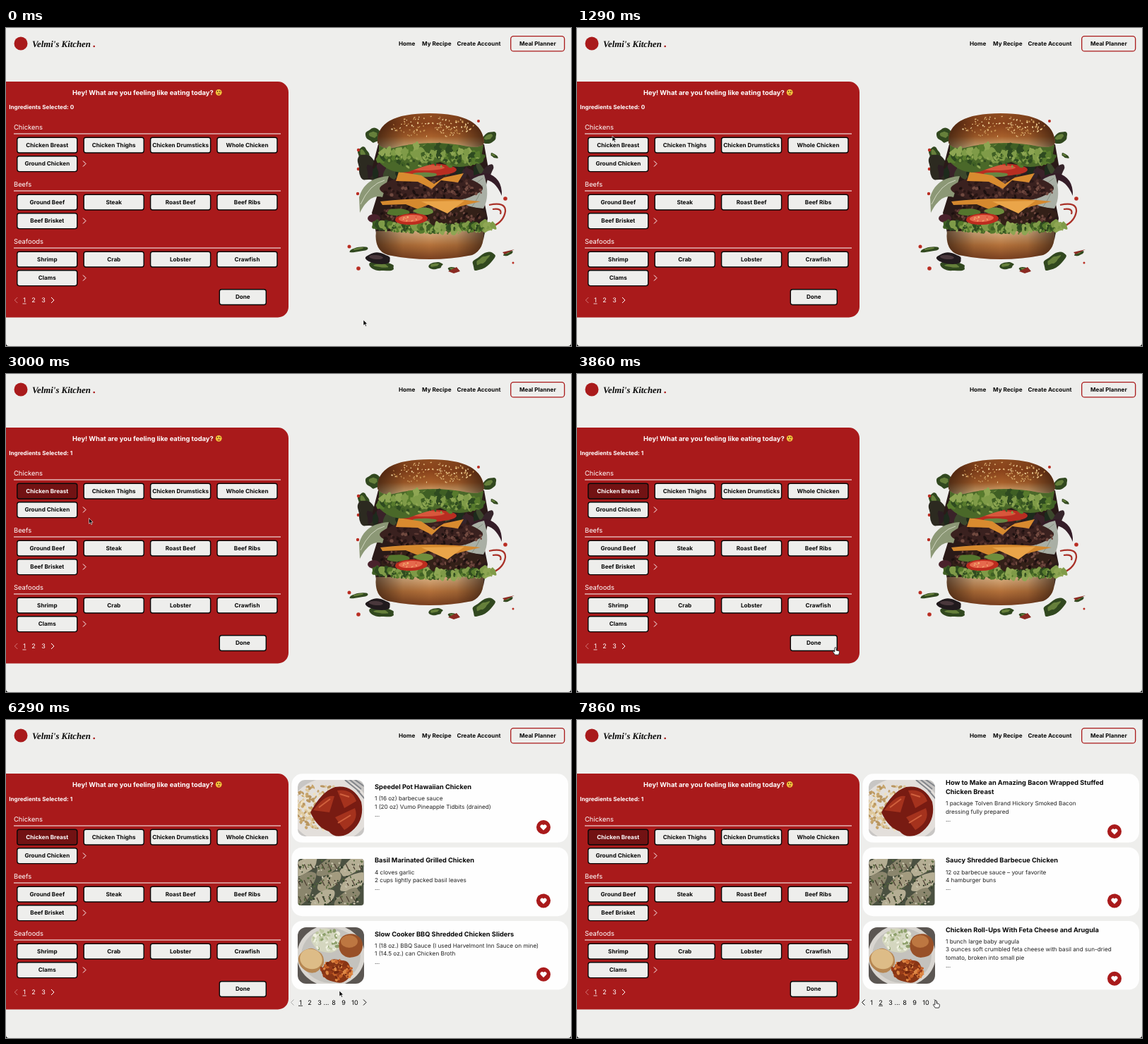
Animation of 800 by 451 pixels, one loop 8 s. Source, as an HTML page:

```html
<!DOCTYPE html>
<html lang="en">
<head>
<meta charset="utf-8">
<title>Recipe finder</title>
<style>
html, body { margin: 0; width: 100%; height: 100%; overflow: hidden; background: #000; }
svg { display: block; width: 100vw; height: 100vh; }
text { font-family: Inter, sans-serif; font-size: 8.15px; text-rendering: geometricPrecision; }
.bold { font-weight: 700; }
.mid { text-anchor: middle; }
.title { font-size: 9.25px; font-weight: 700; }
.body { font-size: 8.2px; fill: #222; }
.page { font-size: 9px; text-anchor: middle; }
.brand { font: italic 700 12.8px "Liberation Serif", serif; }
</style>
</head>
<body>
<svg id="stage" viewBox="0 0 800 451"></svg>
<script>
const RED = '#a91a1b', PAPER = '#eeeeec', INK = '#080808';
const STEP = 1000 / 7, STEPS = 56;

let seed = 11;
const rnd = () => (seed = (seed * 16807) % 2147483647) / 2147483647;
const between = (a, b) => a + (b - a) * rnd();
const pick = list => list[Math.floor(rnd() * list.length)];
const many = (n, make) => Array.from({ length: n }, (_, i) => make(i)).join('');

const text = (x, y, str, cls = '', fill = INK, extra = '') =>
  `<text x="${x}" y="${y}" class="${cls}" fill="${fill}" ${extra}>${str}</text>`;
const rect = (x, y, w, h, r, fill, extra = '') =>
  `<rect x="${x}" y="${y}" width="${w}" height="${h}" rx="${r}" fill="${fill}" ${extra}/>`;
const path = (d, fill, extra = '') => `<path d="${d}" fill="${fill}" ${extra}/>`;
const line = (d, color, w = 1, extra = '') => path(d, 'none', `stroke="${color}" stroke-width="${w}" ${extra}`);
const oval = (x, y, rx, ry, fill, turn = 0) =>
  `<ellipse cx="${x}" cy="${y}" rx="${rx}" ry="${ry}" fill="${fill}" transform="rotate(${turn} ${x} ${y})"/>`;
const dot = (x, y, r, fill, extra = '') => `<circle cx="${x}" cy="${y}" r="${r}" fill="${fill}" ${extra}/>`;
const group = (id, inner) => `<g id="${id}">${inner}</g>`;
const chevron = (x, y, dir, color) =>
  line(`M${x - 2 * dir} ${y - 4}l${4 * dir} 4l${-4 * dir} 4`, color);
const button = (x, y, w, label, id = '') =>
  group(id, rect(x, y, w, 21.8, 3, PAPER, `stroke="${INK}" stroke-width="1.4"`) +
    text(x + w / 2, y + 13.6, label, 'bold mid'));
const stops = colors => colors.map((c, i) => `<stop offset="${i / (colors.length - 1)}" stop-color="${c}"/>`).join('');
const gradient = (id, axis, ...colors) =>
  `<linearGradient id="${id}" x2="${axis === 'x' ? 1 : 0}" y2="${axis === 'y' ? 1 : 0}">${stops(colors)}</linearGradient>`;

// Irregular rounded outline
function blob(x, y, rx, ry, fill, rough = .25, turn = 0) {
  const n = 14, points = Array.from({ length: n }, (_, i) => {
    const a = i / n * 2 * Math.PI, k = 1 - rough * rnd();
    return [x + rx * k * Math.cos(a), y + ry * k * Math.sin(a)];
  });
  const half = (p, q) => `${(p[0] + q[0]) / 2} ${(p[1] + q[1]) / 2}`;
  const d = points.map((p, i) => `Q${p} ${half(p, points[(i + 1) % n])}`).join('');
  return path(`M${half(points[n - 1], points[0])}${d}Z`, fill, `transform="rotate(${turn} ${x} ${y})"`);
}
const specks = (n, x, y, rx, ry, size, colors) => many(n, () => {
  const a = rnd() * 7, k = Math.sqrt(rnd());
  return oval(x + rx * k * Math.cos(a), y + ry * k * Math.sin(a), size * between(.5, 1.2), size * between(.4, .8), pick(colors), between(0, 180));
});
const frill = (n, x0, x1, y, sag, h, colors) => many(n, i => {
  const u = i / (n - 1);
  return blob(x0 + (x1 - x0) * u, y + sag * 4 * u * (1 - u) + between(-3, 3), between(5, 9), between(.6, 1) * h, pick(colors), .5, between(-40, 40));
});
const shaded = (d, fill) => path(d, fill) + path(d, 'url(#shade)');

function burger() {
  const greens = ['#587b2d', '#7f9b48', '#3f5f24', '#8ea653', '#2e4a20'];
  const darks = ['#2b1d22', '#3a2229', '#1d2a1c', '#35242a', '#3c482c'];
  const meat = ['#4d2d29', '#2a1716', '#5e3a33', '#1c100f', '#714a40'];
  const seeds = ['#e0b578', '#c99452', '#edd09a'];
  const leaf = (x, y, rx, ry, turn) => blob(x, y, rx, ry, '#31481f', .3, turn) + blob(x - 1, y - 1, rx * .6, ry * .45, '#66803b', .4, turn);
  const scattered = [[521, 152, 13, 12, 20], [506, 178, 11, 9, 60], [684, 156, 13, 9, -30], [500, 314, 17, 4, -10],
    [532, 338, 21, 8, 5], [608, 337, 12, 6, -10], [634, 343, 9, 4, 10], [676, 330, 22, 11, -35], [711, 320, 9, 3, -20], [691, 181, 7, 3, 30]];
  const berries = [[669, 132, 2], [499, 173, 2.2], [499, 200, 2.3], [498, 235, 2.2], [707, 242, 2.8], [486, 310, 2.5], [499, 341, 2.8], [718, 333, 1.5]];
  return scattered.map(s => leaf(...s)).join('') +
    berries.map(b => dot(...b, '#b92d22')).join('') +
    blob(527, 327, 19, 9, '#211a1d', .15, 5) + oval(524, 325, 10, 3, '#4a383c', 5) +
    path('M626 345l12-6 5 6-9 3zM703 318l17-4-14 7z', '#8b2a22') +
    line('M684 251q24-5 23 9q-2 14-17 21M689 257q14-2 11 7', '#a93128', 2.2) +
    blob(514, 200, 18, 26, '#2c2a20', .4, -25) +
    path('M527 165H677L684 205L676 240L682 270L676 300H526L518 262L528 230L518 200Z', '#2a1a18') +
    frill(22, 516, 682, 204, 0, 18, darks) +
    path('M500 240q8-28 42-30l-9 30q-18-6-32 22z', '#8c9876') + path('M502 250q13-29 34-34', 'none', 'stroke="#d0d5bf"') +
    path('M650 222q8-17 31-16q22 6 21 32q-10-24-27-23z', '#351d28') +
    path('M640 252q4-38 37-44q9 30-1 48z', '#a9afa5') + line('M647 251q8-25 28-38M660 253q10-13 15-30', '#858f82') +
    blob(602, 228, 79, 21, '#3a211f', .1) + specks(120, 602, 229, 73, 16, 3, meat) +
    oval(597, 201, 41, 9, '#b92d21') + oval(592, 198, 29, 4, '#d8573c') +
    blob(592, 208, 20, 4, '#678542', .2) +
    path('M556 204l32 5 18 12 14-9 28-6-8 13-24-3-13 12-20-10-31-1z', '#d98b2f') +
    blob(604, 265, 79, 20, '#332018', .1) + specks(110, 604, 262, 74, 15, 3, meat) +
    path('M530 246q70-8 142 0l-17 4-27 7-26-8-19 8-17-7-33 1z', '#d5892e') + path('M588 246l61-1-24 18z', '#eaa549') +
    oval(521, 270, 9, 6, '#4a222c') + blob(556, 261, 19, 6, '#54752d') + blob(592, 260, 17, 6, '#6e8d3d') +
    shaded('M524 288Q521 316 541 322Q600 334 660 322Q678 314 676 288Z', 'url(#heel)') +
    frill(40, 524, 690, 280, 4, 11, greens) + specks(80, 606, 284, 82, 8, 2.2, greens) +
    oval(574, 271, 23, 8, '#bd2c1e', -3) + oval(573, 270, 17, 5, '#e6694d', -3) + specks(10, 573, 270, 14, 4, 1.3, ['#f1b071', '#c83c27']) +
    path('M528 166Q600 152 676 166L672 190Q640 204 615 190Q590 196 570 204Q545 208 528 190Z', '#4a6829') +
    frill(28, 531, 672, 184, -4, 15, greens) + specks(90, 600, 183, 70, 16, 3, greens) +
    shaded('M526 163Q524 121 600 121Q675 121 677 163Q673 171 654 168Q600 157 548 170Q531 172 526 163Z', 'url(#crown)') +
    specks(130, 602, 140, 60, 15, 1.3, seeds) +
    frill(18, 533, 668, 179, -9, 9, greens);
}

const photo = (id, x, y, w, h, r, inner) =>
  `<clipPath id="${id}">${rect(x, y, w, h, r, INK)}</clipPath><g clip-path="url(#${id})">${inner}</g>`;

function photos() {
  const glazed = rect(413, 85, 94, 80, 0, '#c8c6c4') + oval(459, 128, 56, 46, '#e3dfdb') +
    line('M480 85l21 17M486 84l17 14M493 84l14 10M497 99l12 14', '#83868b', 2) +
    specks(190, 446, 124, 42, 33, 3, ['#dfc99d', '#c7a56c', '#efe0bd', '#b99660']) +
    path('M431 131Q447 101 466 95Q491 91 503 116Q509 145 485 161Q467 170 457 158Q441 153 431 131Z', '#781b12') +
    path('M435 128q17-23 30-20l-7 23zM469 100q21-3 27 15l-17 10zM466 138l28-13q7 18-15 31z', '#a5321d') +
    line('M443 124l16-12M473 105l13 4M470 146l18-11', '#d0603d', 2);
  const grilled = rect(413, 197, 94, 66, 0, '#4b5141') + many(9, i => {
    const x = 423 + (i % 3) * 34 + (i > 5 ? -8 : 0), y = 207 + Math.floor(i / 3) * 23;
    return blob(x, y, 23, 11, pick(['#a39b7f', '#8b866d', '#b5ae94']), .2, -35) +
      many(3, k => line(`M${x - 10 + k * 9} ${y - 3}l4 8`, '#4f4235', 1.4)) +
      specks(20, x, y, 19, 10, 1.7, ['#52653a', '#303d28', '#c6c0a9']);
  });
  const sliders = rect(413, 294, 94, 80, 0, '#5b5652') + oval(460, 334, 48, 44, '#d8d5d0') + oval(460, 334, 42, 39, '#c4c2bd') +
    blob(455, 313, 25, 19, '#d4d6bf', .2) + specks(60, 455, 313, 22, 16, 3, ['#eff0df', '#bdc69f', '#dadfc9', '#8ea06c']) +
    blob(488, 320, 18, 18, '#985027', .08) + oval(486, 314, 12, 9, '#bd7741') +
    blob(432, 341, 20, 18, '#b68651', .1, 20) + oval(432, 339, 16, 14, '#ddbc87', 20) +
    blob(468, 356, 25, 18, '#883515', .2) + specks(75, 468, 355, 22, 15, 3, ['#c66127', '#993b18', '#de8845', '#74270f']);
  return photo('glazed', 413, 85, 94, 80, 10, glazed) + photo('grilled', 413.5, 197, 93, 66, 4, grilled) + photo('sliders', 413, 294, 94, 80, 12, sliders);
}

const heart = (x, y) => dot(x, y, 10, RED) +
  path(`M${x} ${y + 4.5}l-4-4a2.4 2.4 0 0 1 4-3.2a2.4 2.4 0 0 1 4 3.2z`, '#fff');

function recipe(row, titles, lines) {
  const top = row * 104.4, extra = (titles.length + lines.length - 3) * 6;
  let y = 98 + top - extra;
  let out = titles.map((t, i) => text(522, y + i * 13, t, 'title')).join('');
  y += (titles.length - 1) * 13 + 16.3;
  out += [...lines, '...'].map((t, i) => text(522, y + i * 11.2, t, 'body')).join('');
  return out + heart(761, 152 + top + extra);
}

function pager(current) {
  const items = [[417, '1'], [430, '2'], [444, '3'], [453.5, '...'], [464, '8'], [478, '9'], [494, '10']];
  return chevron(405.5, 400.5, -1, current > 1 ? INK : '#aaa') + chevron(508, 400.5, 1, INK) +
    items.map(([x, label]) => text(x, 403.7, label, 'page')).join('') +
    line(`M${items[current - 1][0] - 3} 405.3h6`, INK, .8);
}

const menu = [
  ['Chickens', 'Chicken Breast', 'Chicken Thighs', 'Chicken Drumsticks', 'Whole Chicken', 'Ground Chicken'],
  ['Beefs', 'Ground Beef', 'Steak', 'Roast Beef', 'Beef Ribs', 'Beef Brisket'],
  ['Seafoods', 'Shrimp', 'Crab', 'Lobster', 'Crawfish', 'Clams']
].map(([name, ...items], row) => {
  const y = row * 81;
  return text(11, 143.8 + y, name, '', '#fff', 'style="font-size:9.4px"') + line(`M11 ${150 + y}H389`, '#fff', 1.1) +
    items.map((label, i) => button(15.8 + (i % 4) * 94.4, 155.2 + y + (i > 3 ? 26.6 : 0), 85, label, row + i ? '' : 'choice')).join('') +
    chevron(111, 192.5 + y, 1, '#fff');
}).join('');

const header = dot(21, 22, 9.5, RED) + text(37, 27, "Velmi's Kitchen", 'brand') + dot(124.7, 26, 1.3, RED) +
  text(556, 24.9, 'Home', 'bold') + text(589, 24.9, 'My Recipe', 'bold') + text(638.5, 24.9, 'Create Account', 'bold') +
  rect(714.7, 11.6, 76, 21.3, 4, 'none', `stroke="${RED}" stroke-width="1.3"`) + text(752.8, 24.9, 'Meal Planner', 'bold mid');

const panel = path('M0 76H385a15 15 0 0 1 15 15V395.5a15 15 0 0 1-15 15H0Z', RED) +
  text(94, 94.6, 'Hey! What are you feeling like eating today?', 'bold', '#fff', 'style="font-size:9.35px"') +
  dot(301.2, 91.3, 4.4, '#f4c43d') + oval(299.6, 90, .8, 1, '#5a3a18') + oval(302.8, 90, .8, 1, '#5a3a18') + oval(301.4, 93.3, 1.7, .9, '#a64228') +
  text(4.2, 115.4, '', 'bold', '#fff', 'id="count"') + menu +
  chevron(14.3, 386, -1, '#d47777') + [26, 39, 53].map((x, i) => text(x, 389.2, i + 1, 'page', '#fff')).join('') +
  line('M23.5 391h5', '#fff', .8) + chevron(66, 386, 1, '#fff') + button(302.3, 370.7, 66, 'Done');

const results = [0, 1, 2].map(i => rect(404.5, 76.3 + i * 104.4, 391.5, 97.5, 15, '#fefefe')).join('') + photos() +
  group('page1',
    recipe(0, ['Speedel Pot Hawaiian Chicken'], ['1 (16 oz) barbecue sauce', '1 (20 oz) Vumo Pineapple Tidbits (drained)']) +
    recipe(1, ['Basil Marinated Grilled Chicken'], ['4 cloves garlic', '2 cups lightly packed basil leaves']) +
    recipe(2, ['Slow Cooker BBQ Shredded Chicken Sliders'], ['1 (18 oz.) BBQ Sauce (I used Harvelmont Inn Sauce on mine)', '1 (14.5 oz.) can Chicken Broth']) + pager(1)) +
  group('page2',
    recipe(0, ['How to Make an Amazing Bacon Wrapped Stuffed', 'Chicken Breast'], ['1 package Tolven Brand Hickory Smoked Bacon', 'dressing fully prepared']) +
    recipe(1, ['Saucy Shredded Barbecue Chicken'], ['12 oz barbecue sauce – your favorite', '4 hamburger buns']) +
    recipe(2, ['Chicken Roll-Ups With Feta Cheese and Arugula'], ['1 bunch large baby arugula', '3 ounces soft crumbled feta cheese with basil and sun-dried', 'tomato, broken into small pie']) + pager(2));

const cursor =
  path('M0 0V8l1.9-1.7 1.3 2.9 1.3-.6-1.3-2.8H5.7z', '#000', 'id="arrow" stroke="#fff" stroke-width=".6"') +
  path('M-1.2 1a1.2 1.2 0 0 1 2.4 0v3l3.4.8q1.1.4.9 1.6l-.5 2.4-.6 1.4H-.8L-3.5 6.3q-.4-1.2.8-1.2l1.5 1z', '#fff', 'id="hand" stroke="#222" stroke-width=".9"');

document.getElementById('stage').innerHTML =
  `<defs>${gradient('crown', 'y', '#8f4c20', '#8a431b', '#a8602b', '#dcbb86')}${gradient('heel', 'y', '#d9b184', '#b3713a', '#7a4020')}` +
  `${gradient('shade', 'x', '#1c0c06a0', '#1c0c0620', '#1c0c0600', '#1c0c0620', '#1c0c06a0')}</defs>` +
  path('M0 0H800V447a4 4 0 0 1-4 4H4a4 4 0 0 1-4-4Z', PAPER) + header + panel +
  group('burger', burger()) +
  group('loading', dot(0, 208, 3.5, RED, 'id="loader"') + text(600, 224.4, 'Loading...', 'bold mid', INK, 'style="font-size:10.4px"')) +
  group('results', results) + group('cursor', cursor);

const el = id => document.getElementById(id);
const show = (id, on) => el(id).style.display = on ? '' : 'none';

// step, x, y
const trail = [[0, 506, 414], [1, 506, 414], [8, 50, 153], [10, 50, 153], [16, 56, 159], [19, 56, 159], [26, 366, 388],
  [29, 366, 388], [34, 472, 384], [44, 472, 384], [48, 496, 418], [52, 508, 398], [STEPS, 508, 398]];
function pointerAt(step) {
  const i = trail.findIndex(k => k[0] > step);
  const [s0, x0, y0] = trail[i - 1], [s1, x1, y1] = trail[i];
  const u = (step - s0) / (s1 - s0), e = u * u * (3 - 2 * u);
  return [x0 + (x1 - x0) * e, y0 + (y1 - y0) * e];
}

function draw(now) {
  const step = Math.floor((now + 5) / STEP) % STEPS;
  const picked = step >= 18, loading = step >= 30 && step < 39, second = step >= 53;
  el('count').textContent = 'Ingredients Selected: ' + (picked ? 1 : 0);
  const [box, label] = el('choice').children;
  box.setAttribute('fill', picked ? '#721213' : PAPER);
  label.setAttribute('fill', picked ? '#fff' : INK);
  show('burger', step < 30);
  show('loading', loading);
  show('results', step >= 39);
  show('page1', !second);
  show('page2', second);
  el('loader').setAttribute('cx', 600 - 7 * Math.cos((step - 37) * 2 * Math.PI / 7));
  const pointing = (step >= 25 && step < 30) || step >= 51;
  show('hand', pointing);
  show('arrow', !pointing);
  el('cursor').setAttribute('transform', `translate(${pointerAt(step)})`);
  requestAnimationFrame(() => draw(performance.now() - start));
}
const start = performance.now();
draw(0);
</script>
</body>
</html>
```
